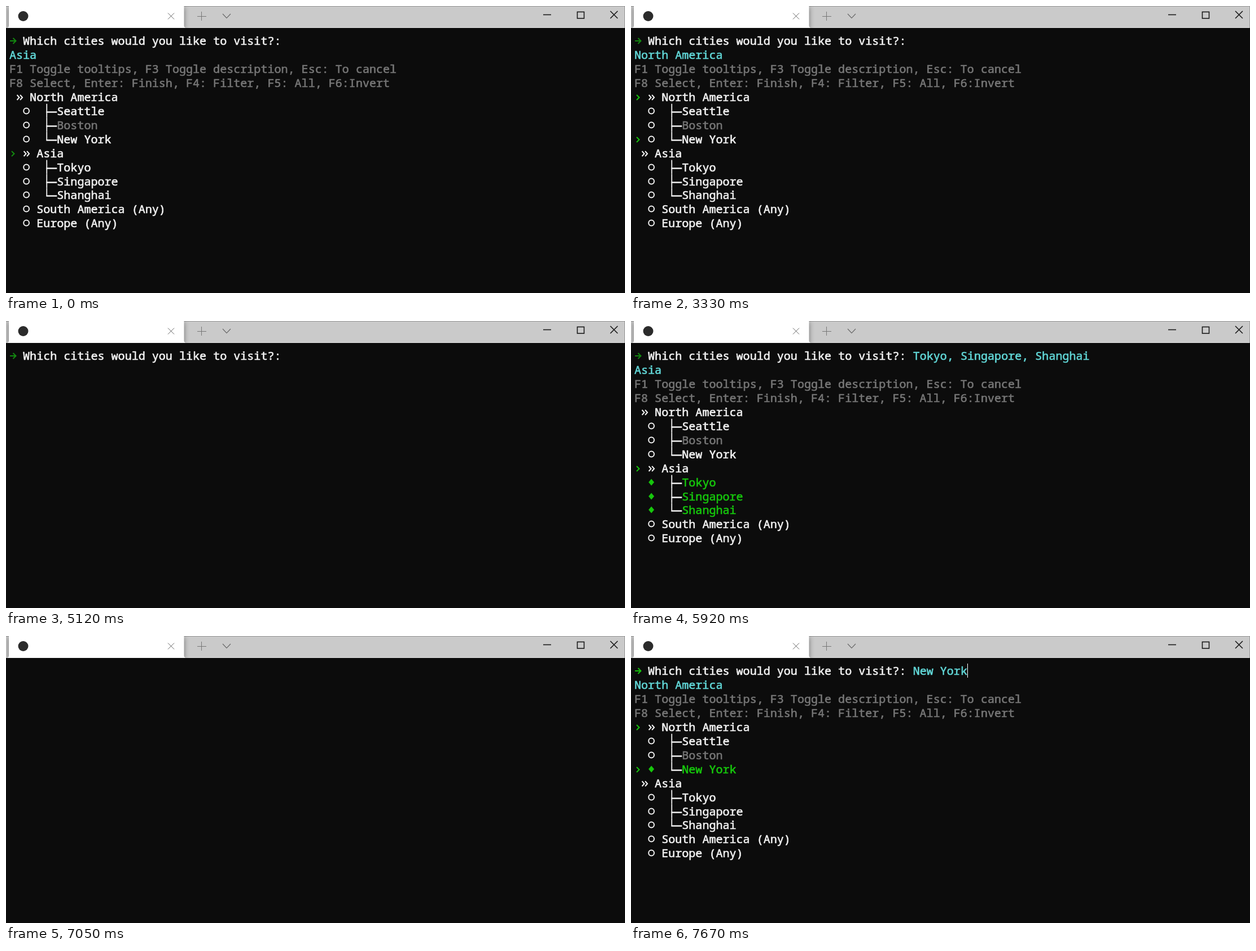
Animation, 1097 px wide and 510 px high, one loop 8000 ms. Source, as an HTML page with a canvas:

```html
<!DOCTYPE html>
<html lang="en">
<head>
<meta charset="utf-8">
<title>City picker</title>
<style>
  html, body { margin: 0; width: 100%; height: 100%; overflow: hidden; background: #0c0c0c; }
  canvas { display: block; }
</style>
</head>
<body>
<canvas id="stage" width="1097" height="510"></canvas>
<script>
const ctx = document.getElementById('stage').getContext('2d');
const LOOP = 8000, CELL = 12.04, LINE = 24.96;
const WHITE = '#f2f2f2', GREY = '#767676', CYAN = '#61d6d6', GREEN = '#16c60c', DIM = '#138a10';

const groups = [
  { name: 'North America', cities: ['Seattle', 'Boston', 'New York'] },
  { name: 'Asia', cities: ['Tokyo', 'Singapore', 'Shanghai'] }
];
const others = ['South America (Any)', 'Europe (Any)'];
const disabled = 'Boston';

const asia = { group: 'Asia', picked: [], mark: DIM, arrow: DIM };
const newYork = { group: 'North America', focus: 'New York', picked: [], mark: GREEN, arrow: DIM };
const allAsia = { ...asia, picked: groups[1].cities, mark: GREEN };
const newYorkLit = { ...newYork, arrow: GREEN };
const newYorkPicked = { ...newYorkLit, picked: ['New York'] };
const promptOnly = { arrow: DIM, picked: [] };

// [start time, view, cursor visible]
const timeline = [
  [0, asia, false], [790, asia, true], [1320, asia, false], [1850, asia, true],
  [2450, newYork, false], [2580, newYork, true], [3330, newYork, false], [3860, newYork, true],
  [4130, asia, true], [4790, asia, false],
  [5120, promptOnly, false], [5190, allAsia, true], [5920, allAsia, false],
  [6450, promptOnly, false], [6520, asia, true],
  [7050, null, false], [7120, newYorkLit, true],
  [7600, promptOnly, false], [7670, newYorkPicked, true]
];

const colX = col => 6 + col * CELL;
const baseline = row => Math.round(68.9 + row * LINE);
const midY = row => baseline(row) - 7.5;

// A thin outline gives the text its medium weight.
function text(str, col, row, color) {
  ctx.fillStyle = ctx.strokeStyle = color;
  ctx.lineWidth = 0.65;
  ctx.lineJoin = 'round';
  ctx.fillText(str, colX(col), baseline(row));
  ctx.strokeText(str, colX(col), baseline(row));
  ctx.lineJoin = 'miter';
}

function stroke(color, width, ...lines) {
  ctx.strokeStyle = color;
  ctx.lineWidth = width;
  ctx.beginPath();
  for (const [start, ...rest] of lines) {
    ctx.moveTo(...start);
    rest.forEach(p => ctx.lineTo(...p));
  }
  ctx.stroke();
}

function chevron(x, y, w, h, color) {
  stroke(color, 2, [[x, y - h], [x + w, y], [x, y + h]]);
}

function cross(x, y, r, color, width) {
  stroke(color, width, [[x - r, y - r], [x + r, y + r]], [[x + r, y - r], [x - r, y + r]]);
}

function titleBar() {
  ctx.fillStyle = '#cacaca';
  ctx.fillRect(0, 0, 1097, 39);
  ctx.fillStyle = '#dedede';
  ctx.fillRect(0, 38, 1097, 1);
  ctx.fillStyle = '#999';
  ctx.fillRect(0, 0, 1097, 1);
  ctx.fillRect(1096, 0, 1, 39);

  ctx.save();
  ctx.beginPath();
  ctx.rect(0, 0, 1097, 39);
  ctx.clip();
  ctx.shadowColor = 'rgba(0,0,0,.45)';
  ctx.shadowBlur = 10;
  ctx.shadowOffsetY = 2;
  ctx.fillStyle = '#fff';
  ctx.beginPath();
  ctx.moveTo(5, 0);
  ctx.lineTo(315.5, 0);
  ctx.lineTo(315.5, 35);
  ctx.quadraticCurveTo(315.5, 38, 319, 39);
  ctx.lineTo(2, 39);
  ctx.quadraticCurveTo(5, 38, 5, 35);
  ctx.fill();
  ctx.restore();

  ctx.fillStyle = '#2b2b2b';
  ctx.beginPath();
  ctx.arc(30.5, 18, 9, 0, 7);
  ctx.fill();

  cross(292.5, 18, 5.5, '#666', 1);
  stroke('#777', 1, [[339, 18.5], [355, 18.5]], [[346.5, 10], [346.5, 26]]);
  stroke('#666', 1.1, [[384, 14], [391, 21.5], [398, 14]]);
  stroke('#1a1a1a', 1.6, [[952, 15.5], [966, 15.5]]);
  ctx.lineWidth = 1.6;
  ctx.strokeRect(1012.5, 10.5, 12, 11.5);
  cross(1077.5, 15.5, 6.5, '#1a1a1a', 1.6);
}

function promptLine(view) {
  const y = midY(0) + 0.5;
  stroke(view.arrow, 2, [[7, y], [17, y]], [[12.5, y - 5], [17.5, y], [12.5, y + 5]]);
  text('Which cities would you like to visit?:', 2, 0, WHITE);
}

function bullet(row, picked) {
  const x = colX(2.5), y = midY(row);
  ctx.beginPath();
  if (picked) {
    ctx.fillStyle = GREEN;
    ctx.moveTo(x, y - 6);
    ctx.lineTo(x + 5, y);
    ctx.lineTo(x, y + 6);
    ctx.lineTo(x - 5, y);
    ctx.fill();
  } else {
    ctx.strokeStyle = WHITE;
    ctx.lineWidth = 2;
    ctx.arc(x, y, 4.9, 0, 7);
    ctx.stroke();
  }
}

function marker(row, color) {
  chevron(10, midY(row) + 1, 4.5, 4.5, color);
}

function groupTitle(name, row, active, color) {
  const shift = active ? 1 : 0, x = colX(1 + shift) + 1.5, y = midY(row) + 1;
  if (active) marker(row, color);
  chevron(x, y, 4, 4.5, WHITE);
  chevron(x + 5.5, y, 4, 4.5, WHITE);
  text(name, 3 + shift, row, WHITE);
}

function branch(row, last) {
  const x = colX(5.5), top = 49 + row * LINE, y = baseline(row) - 5.5;
  stroke(WHITE, 1.8, [[x, top], [x, last ? y : top + LINE]]);
  stroke(WHITE, 2.5, [[x - 0.9, y], [colX(7), y]]);
}

function menu(view) {
  text(view.group, 0, 1, CYAN);
  text('F1 Toggle tooltips, F3 Toggle description, Esc: To cancel', 0, 2, GREY);
  text('F8 Select, Enter: Finish, F4: Filter, F5: All, F6:Invert', 0, 3, GREY);
  let row = 4;
  for (const group of groups) {
    groupTitle(group.name, row++, group.name === view.group, view.mark);
    group.cities.forEach((city, i) => {
      const picked = view.picked.includes(city);
      if (city === view.focus) marker(row, view.mark);
      bullet(row, picked);
      branch(row, i === group.cities.length - 1);
      text(city, 7, row++, picked ? GREEN : city === disabled ? GREY : WHITE);
    });
  }
  for (const name of others) {
    bullet(row, false);
    text(name, 4, row++, WHITE);
  }
}

function draw(time) {
  const [, view, cursor] = timeline.findLast(step => step[0] <= time);
  ctx.fillStyle = '#0c0c0c';
  ctx.fillRect(0, 0, 1097, 510);
  titleBar();
  if (!view) return;
  ctx.font = '500 20.07px "Noto Sans Mono", "DejaVu Sans Mono", monospace';
  promptLine(view);
  if (view.group) menu(view);
  const answer = view.picked.join(', ');
  text(answer, 41, 0, CYAN);
  if (cursor) {
    ctx.fillStyle = '#fff';
    ctx.fillRect(Math.round(colX(41 + answer.length)), 49, 1, 25);
  }
}

const begin = performance.now();
function tick() {
  draw((performance.now() - begin) % LOOP);
  requestAnimationFrame(tick);
}
tick();
</script>
</body>
</html>
```
